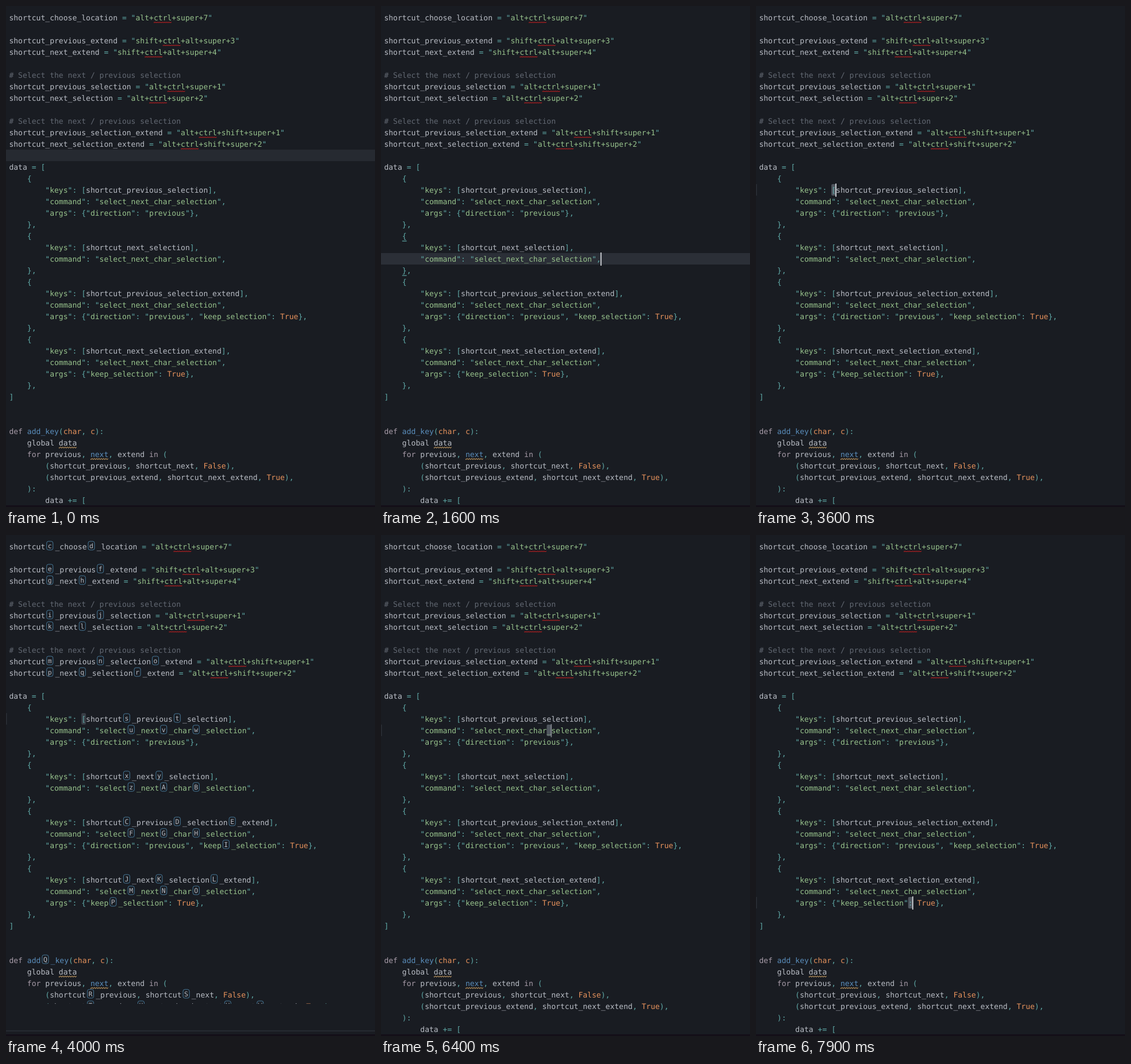
These frames come from a looping animation (642 px wide and 872 px high, 8 s). An HTML page with a canvas:

```html
<!DOCTYPE html>
<html lang="en">
<head>
<meta charset="utf-8">
<title>Jump to character</title>
<style>
  html, body { margin: 0; width: 100%; height: 100%; overflow: hidden; background: #191c22; }
  canvas { display: block; width: 642px; height: 872px; }
</style>
</head>
<body>
<canvas id="stage"></canvas>
<script>
const W = 642, H = 872, LOOP = 8000;
const LEFT = 5.4, CELL = 7.86, ROW = 20, TOP = 10, GAP = 17.2;
const FAMILY = '"DejaVu Sans Mono", "Noto Sans Mono", monospace';
const FONT = '13.06px ' + FAMILY, LABEL_FONT = '11.5px ' + FAMILY;
const ALPHABET = 'abcdefghijklmnopqrstuvwxyzABCDEFGHIJKLMNOPQRSTUVWXYZ';
const COLOR = {
  back: '#191c22', text: '#b9bdc5', string: '#97c28c', punct: '#5fa9a7', comment: '#626872',
  orange: '#e6925c', name: '#5a8dbb', keyword: '#a79ba8', red: '#961e20', tan: '#a58355',
  label: '#477898', caret: '#dcdfe4'
};

const lines = `shortcut_choose_location = "alt+ctrl+super+7"

shortcut_previous_extend = "shift+ctrl+alt+super+3"
shortcut_next_extend = "shift+ctrl+alt+super+4"

# Select the next / previous selection
shortcut_previous_selection = "alt+ctrl+super+1"
shortcut_next_selection = "alt+ctrl+super+2"

# Select the next / previous selection
shortcut_previous_selection_extend = "alt+ctrl+shift+super+1"
shortcut_next_selection_extend = "alt+ctrl+shift+super+2"

data = [
    {
        "keys": [shortcut_previous_selection],
        "command": "select_next_char_selection",
        "args": {"direction": "previous"},
    },
    {
        "keys": [shortcut_next_selection],
        "command": "select_next_char_selection",
    },
    {
        "keys": [shortcut_previous_selection_extend],
        "command": "select_next_char_selection",
        "args": {"direction": "previous", "keep_selection": True},
    },
    {
        "keys": [shortcut_next_selection_extend],
        "command": "select_next_char_selection",
        "args": {"keep_selection": True},
    },
]


def add_key(char, c):
    global data
    for previous, next, extend in (
        (shortcut_previous, shortcut_next, False),
        (shortcut_previous_extend, shortcut_next_extend, True),
    ):
        data += [`.split('\n');

const canvas = document.getElementById('stage');
const ratio = window.devicePixelRatio || 1;
canvas.width = W * ratio;
canvas.height = H * ratio;
const ctx = canvas.getContext('2d');
ctx.scale(ratio, ratio);
ctx.textRendering = 'geometricPrecision';

const rules = [
  [/#.*/g, 'comment'], [/"[^"]*"/g, 'string'], [/\b(True|False|char|c)\b/g, 'orange'],
  [/\b(def|for|in)\b/g, 'keyword'], [/\b(add_key|next)\b/g, 'name'], [/[=+\[\]{}(),:]/g, 'punct']
];

// One colour per character; earlier rules win.
function paint(line) {
  const out = Array(line.length).fill(null);
  for (const [re, kind] of rules)
    for (const m of line.matchAll(re)) {
      if (out[m.index]) continue;
      const end = m.index + m[0].length;
      out.fill(kind, m.index, end);
      if (kind === 'string') out[m.index] = out[end - 1] = 'punct';
    }
  return out.map(kind => COLOR[kind || 'text']);
}
const colors = lines.map(paint);

const marks = [];
lines.forEach((line, row) => {
  for (const m of line.matchAll(/ctrl/g)) marks.push([row, m.index, COLOR.red]);
  const m = /^ +global (?=data)|^ +for previous, (?=next)/.exec(line);
  if (m) marks.push([row, m[0].length, COLOR.tan]);
});

function findLabels(char, skip) {
  let n = skip;
  return lines.map(line => {
    const found = new Map();
    [...line].forEach((c, col) => {
      if (c === char) found.set(col, ALPHABET[n++]);
    });
    return found;
  });
}

// Each jump: panel opens, labels appear, target is selected.
const jumps = [
  { open: 2000, show: 2150, done: 2400, labels: findLabels('[', 0), row: 15, col: 16 },
  { open: 3750, show: 3850, done: 5900, labels: findLabels('_', 2), row: 16, col: 36 },
  { open: 6800, show: 6950, done: 7500, labels: findLabels(':', 0), row: 31, col: 33 }
];
const CLICK = 1200;
const none = lines.map(() => new Map());

function rect(x, y, w, h, color) {
  ctx.fillStyle = color;
  ctx.fillRect(x, y, w, h);
}

function roundBox(x, y, w, h, r) {
  ctx.beginPath();
  ctx.roundRect(x, y, w, h, r);
}

function xAt(labels, row, col) {
  let n = 0;
  for (const c of labels[row].keys()) if (c <= col) n++;
  return LEFT + col * CELL + n * GAP;
}

function wave(x, y, width, color) {
  ctx.strokeStyle = color;
  const flat = color === COLOR.red;
  ctx.lineWidth = flat ? 1.4 : 1.1;
  ctx.beginPath();
  for (let i = 0; i <= width; i++)
    ctx.lineTo(x + i, y + Math.sin(i * Math.PI / 2) * (flat ? 0.2 : 0.9));
  ctx.stroke();
}

function drawLabel(x, mid, letter) {
  ctx.strokeStyle = COLOR.label;
  ctx.lineWidth = 1;
  roundBox(x - 14.7, mid - 9, 11, 15, 3);
  ctx.stroke();
  ctx.font = LABEL_FONT;
  ctx.textAlign = 'center';
  ctx.fillStyle = COLOR.text;
  ctx.fillText(letter, x - 9.2, mid + 2.8);
  ctx.font = FONT;
  ctx.textAlign = 'left';
}

function drawCaret(x, mid, age) {
  const phase = age % 1000;
  ctx.globalAlpha = phase < 450 ? 1 : phase < 550 ? (550 - phase) / 100 : phase < 900 ? 0 : (phase - 900) / 100;
  rect(x - 0.8, mid - 11, 1.7, 23, COLOR.caret);
  ctx.globalAlpha = 1;
}

function draw(t) {
  const active = jumps.find(j => t >= j.open && t < j.done);
  const past = jumps.filter(j => t >= j.done).pop();
  const labels = active && t >= active.show ? active.labels : none;
  const midOf = row => TOP + row * ROW + ROW / 2;

  rect(0, 0, W, H, COLOR.back);
  ctx.font = FONT;
  ctx.textBaseline = 'alphabetic';

  ctx.save();
  ctx.beginPath();
  ctx.rect(0, 0, W, active ? 816 : H);
  ctx.clip();

  if (past) {
    const mid = midOf(past.row);
    rect(0, mid - 10, 1.5, 20, '#2b2f36');
    ctx.fillStyle = active ? '#393e46' : '#50565f';
    roundBox(xAt(labels, past.row, past.col), mid - 10, CELL, 20, 2);
    ctx.fill();
  } else {
    const row = t < CLICK ? 12 : 21;
    rect(0, midOf(row) - 10, W, 20, t < CLICK || active ? '#262a31' : '#2b2f37');
  }

  lines.forEach((line, row) => {
    const mid = midOf(row);
    let x = LEFT;
    for (let col = 0; col < line.length; col++, x += CELL) {
      const letter = labels[row].get(col);
      if (letter) {
        x += GAP;
        drawLabel(x, mid, letter);
      }
      if (line[col] === ' ') continue;
      ctx.fillStyle = colors[row][col];
      ctx.fillText(line[col], x, mid + 5);
    }
  });

  for (const [row, col, color] of marks)
    wave(xAt(labels, row, col), midOf(row) + 8.5, CELL * 4, color);

  if (!past && t >= CLICK)
    for (const row of [19, 22]) rect(LEFT + 4 * CELL, midOf(row) + 8.5, CELL, 1.2, COLOR.punct);

  if (!active && past)
    drawCaret(xAt(labels, past.row, past.col) + CELL, midOf(past.row), t - past.done);
  else if (!active && t >= CLICK)
    drawCaret(LEFT + 48 * CELL, midOf(21), t - CLICK);
  ctx.restore();

  if (active) rect(0, 862.5, W, 1.2, '#30343c');
  rect(0, 869, W, 3, '#130f18');
}

const start = performance.now();
function frame() {
  draw((performance.now() - start) % LOOP);
  requestAnimationFrame(frame);
}
frame();
</script>
</body>
</html>
```
